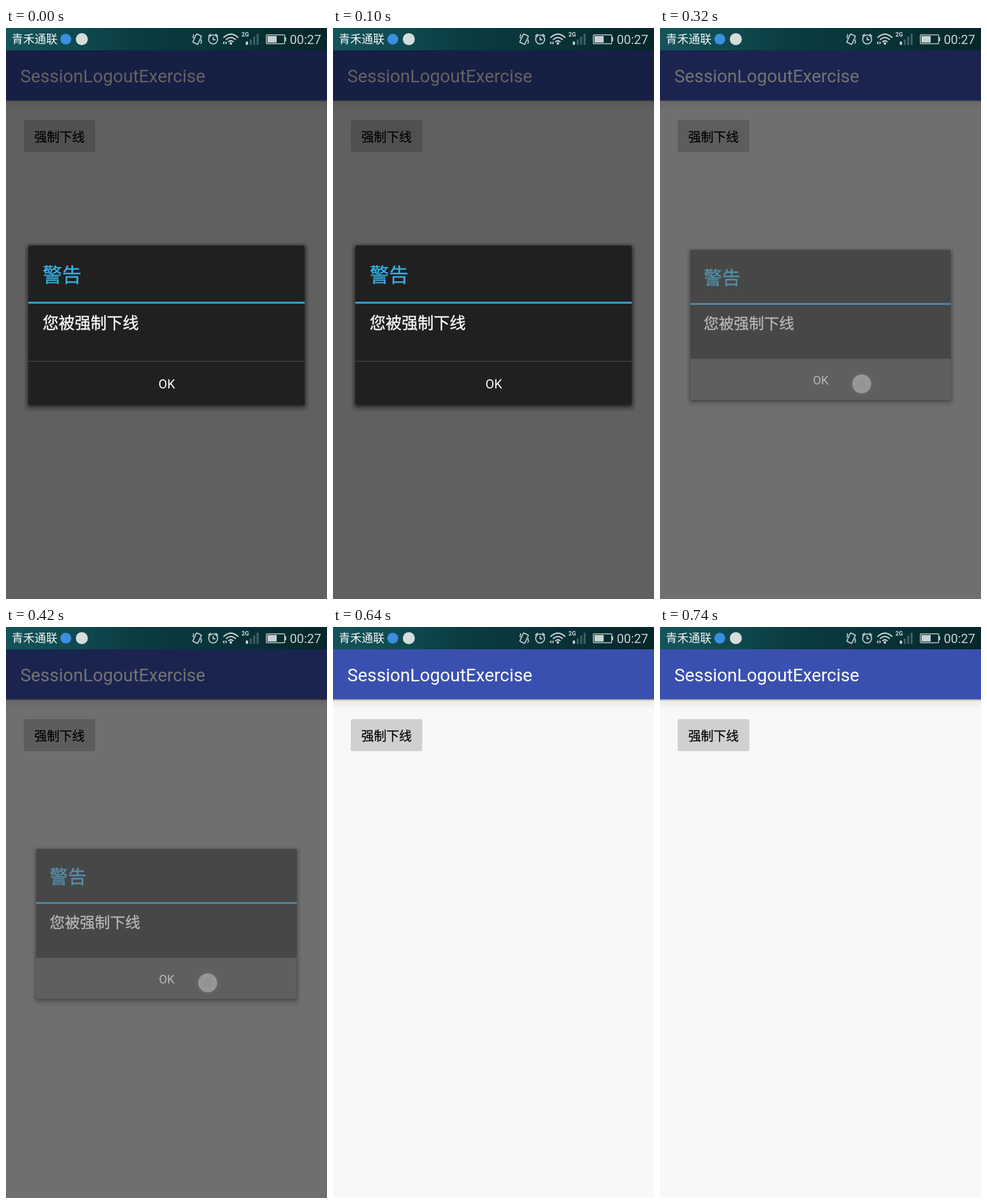
An HTML page that plays this animation: 561x998 px, repeating every 0.8 s.

```html
<!DOCTYPE html>
<html lang="zh-CN">
<head>
<meta charset="utf-8">
<title>Dialog dismiss</title>
<style>
  html, body { margin: 0; width: 100%; height: 100%; overflow: hidden; background: #f8f8f8; }
  svg { display: block; width: 100vw; height: 100vh; }
  text { font-family: Roboto, "Noto Sans CJK SC", "Noto Sans CJK", sans-serif; }
  .han { font-family: "Noto Sans CJK SC", "Noto Sans CJK", sans-serif; stroke-width: .45; }
</style>
</head>
<body>
<svg viewBox="0 0 561 998">
  <defs>
    <linearGradient id="bar">
      <stop offset="0" stop-color="#14545b"/>
      <stop offset=".25" stop-color="#0f484d"/>
      <stop offset=".4" stop-color="#0a3c42"/>
      <stop offset=".6" stop-color="#08363b"/>
      <stop offset="1" stop-color="#06262a"/>
    </linearGradient>
    <linearGradient id="drop" x2="0" y2="1">
      <stop offset="0" stop-color="#000" stop-opacity=".5"/>
      <stop offset=".17" stop-color="#000" stop-opacity=".1"/>
      <stop offset=".3" stop-color="#000" stop-opacity=".045"/>
      <stop offset="1" stop-color="#000" stop-opacity=".025"/>
    </linearGradient>
    <filter id="soft" x="-10%" y="-10%" width="120%" height="120%">
      <feGaussianBlur stdDeviation="3.5"/>
    </filter>
  </defs>

  <!-- app screen -->
  <rect width="561" height="998" fill="#f8f8f8"/>
  <rect y="126" width="561" height="15" fill="url(#drop)"/>
  <rect y="39" width="561" height="87" fill="#3a50b0"/>
  <text x="25" y="95" font-size="31.2" fill="#fff">SessionLogoutExercise</text>
  <rect x="31" y="161" width="125" height="56" rx="2.5" fill="#d0d0d0"/>
  <text class="han" x="49.5" y="198" font-size="22" fill="#111" stroke="#111">强制下线</text>
  <rect id="dim" y="39" width="561" height="959"/>

  <!-- status bar -->
  <rect width="561" height="39" fill="url(#bar)"/>
  <text class="han" x="10" y="27" font-size="20" fill="#f2f6f6">青禾通联</text>
  <circle cx="104.5" cy="19.5" r="9.5" fill="#3c8ee0"/>
  <circle cx="132.5" cy="19.5" r="10.5" fill="#d4dcdc"/>
  <g fill="none" stroke="#c8d2d2" stroke-width="1.8">
    <rect x="-4.8" y="-8" width="9.6" height="16" rx="1" transform="translate(334 19.5) rotate(25)"/>
    <path d="M327 11l1.5 2.5-2 2 1.5 2.5M342 20l-1.5 2.5 1.5 2-2 3" stroke-width="1.5"/>
    <circle cx="362" cy="20" r="7.8"/>
    <path d="M362 15.5V20.5H366M353.500 14.5L358 10.5M370.5 14.5L366 10.5"/>
    <path d="M380 17Q393 4.5 406 17M384.5 20.8Q393 12.5 401.5 20.8M388.5 24.5Q393 20 397.5 24.5" stroke-width="2.3"/>
  </g>
  <g fill="#c8d2d2">
    <circle cx="393" cy="27" r="2.2"/>
    <path d="M378.5 26l3-3v6zM386.5 26l-3-3v6z"/>
    <text x="411.5" y="15" font-size="10.5" font-weight="700">2G</text>
    <rect x="419" y="23.5" width="4" height="6" rx="1.5"/>
    <g fill="#3f6064">
      <rect x="426" y="20" width="3.5" height="9.5"/>
      <rect x="432" y="15" width="3.5" height="14.5"/>
      <rect x="438" y="10" width="3.5" height="19.5"/>
    </g>
    <rect x="455" y="12" width="32" height="15.5" rx="1" fill="none" stroke="#c8d2d2" stroke-width="1.5"/>
    <rect x="457" y="14" width="16" height="11.5"/>
    <rect x="487" y="16" width="2.5" height="7"/>
    <text x="496" y="28" font-size="22">00:27</text>
  </g>

  <!-- alert dialog -->
  <g id="dialog">
    <rect x="33" y="375.5" width="495" height="294" rx="6" opacity=".07"/>
    <rect x="38" y="382" width="485" height="280" rx="3" opacity=".65" filter="url(#soft)"/>
    <rect x="39" y="380" width="483" height="278.5" rx="2.5" fill="#202020"/>
    <path d="M40 380H521" stroke="#343434"/>
    <text class="han" x="64" y="444" font-size="34" fill="#36b0e4" stroke="#36b0e4">警告</text>
    <rect x="39" y="478.5" width="483" height="3.2" fill="#36a8e4"/>
    <text class="han" x="64" y="526" font-size="28" fill="#f8f8f8" stroke="#f8f8f8">您被强制下线</text>
    <rect id="press" x="39" y="582" width="483" height="76" fill="#505050"/>
    <path d="M39 582.5H522" stroke="#505050"/>
    <text x="281" y="629.5" font-size="22" fill="#fff" text-anchor="middle">OK</text>
  </g>

  <!-- touch point -->
  <g id="touch">
    <g id="glow">
      <circle cx="352.5" cy="622" r="21.5" fill="#8a929a" opacity=".3"/>
      <circle cx="352.5" cy="622" r="18.5" fill="#6f8ea8" opacity=".6"/>
    </g>
    <circle cx="352.5" cy="622" r="16.5" fill="#cbcbcb"/>
    <circle cx="352.5" cy="622" r="8" fill="#bfbfbf" opacity=".7"/>
  </g>
</svg>
<script>
  const HOLD = 160;
  const steps = [
    { dim: .612, dialog: 1, scale: 1, press: 0, touch: 0, glow: 0 },
    { dim: .612, dialog: 1, scale: 1, press: 1, touch: 1, glow: 1 },
    { dim: .548, dialog: .5, scale: .943, press: 1, touch: .52, glow: .4 },
    { dim: .322, dialog: 0, scale: .9, press: 0, touch: .23, glow: 0 },
    { dim: 0, dialog: 0, scale: .9, press: 0, touch: 0, glow: 0 }
  ];
  const el = id => document.getElementById(id);
  const fade = (id, value) => el(id).setAttribute("opacity", value);

  function draw(ms) {
    const s = steps[Math.floor(ms / HOLD) % steps.length];
    for (const id of ["dim", "dialog", "press", "touch", "glow"]) fade(id, s[id]);
    el("dialog").setAttribute("transform",
      `translate(280.5 519) scale(${s.scale}) translate(-280.5 -519)`);
  }

  const start = performance.now();
  function tick() {
    draw(performance.now() - start);
    requestAnimationFrame(tick);
  }
  tick();
</script>
</body>
</html>
```
